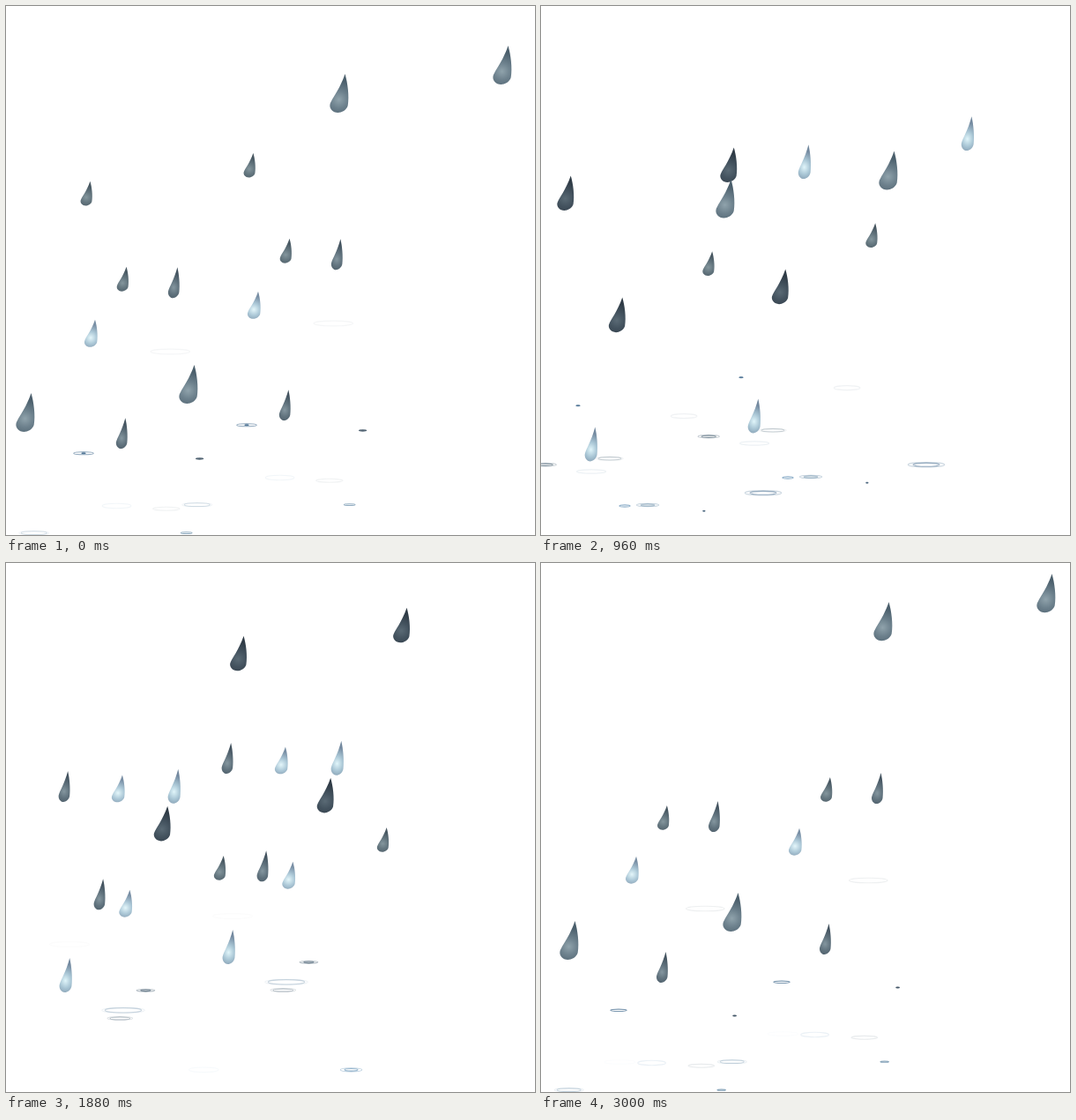
Recreate the animation shown at these times as an HTML page with a canvas. Size 600x600 px, loop 3.04 s.

```html
<!DOCTYPE html>
<html lang="en">
<head>
<meta charset="utf-8">
<title>Rain</title>
<style>
html, body { margin: 0; width: 100%; height: 100%; overflow: hidden; background: #fff; }
canvas { display: block; }
</style>
</head>
<body>
<canvas id="stage" width="600" height="600"></canvas>
<script>
const ctx = document.getElementById('stage').getContext('2d');
const STEP = 40, STEPS = 76, FALL = 14, RING_LIFE = 18, RING_DELAY = 4;
const VX = -10, VY = 32.9;

// Showers: landing offset x, y, delay in steps, optional cut-off age
const wide = [[0, 0, 0], [-82, 45, 7], [164, 45, 18], [-46, -54, 28], [45, 0, 37]];
const steep = [[0, 0, 0], [-115, 11, 5, 11], [81, 5, 25], [127, -45, 30], [164, 90, 48]];

// Placements of the showers, with drop colours from centre to edge
const clouds = [
  { drops: steep, x: 257, y: 400.5, start: 26, sx: .9, sy: .9, fill: ['#5a6a75', '#44535f', '#2f3b46'], ring: '#34495b' },
  { drops: steep, x: 269, y: 469, start: 51, sx: .615, sy: .797, fill: ['#84969f', '#61737e', '#43535f'], ring: '#45627b' },
  { drops: steep, x: 263, y: 481.3, start: 9, sx: .633, sy: .633, fill: ['#84969d', '#64767f', '#465660'], ring: '#455d6f' },
  { drops: wide, x: 280, y: 535, start: 20, sx: .68, sy: .885, fill: ['#e0f5fa', '#a9c6d5', '#73899f'], ring: '#5f8fb4' },
  { drops: wide, x: 274.4, y: 534, start: 54, sx: .703, sy: .703, fill: ['#e4f6fa', '#adc9d8', '#788ea4'], ring: '#648aa6' },
  { drops: wide, x: 273, y: 475.3, start: 71, sx: 1, sy: 1, fill: ['#90a3ac', '#6d818d', '#4b5f6c'], ring: '#456c8f' }
];
const copies = [[-185, 32], [0, 0]];

const dropShape = new Path2D(
  'M0 0C3 10 5 25 3.2 36C2 41 -4 44 -8 44C-14 44 -18 39 -17 34.5C-14.5 27 -6.5 19 0 0Z');

function dropFill([centre, middle, edge]) {
  const g = ctx.createRadialGradient(-7, 29, 0, -7, 29, 24);
  g.addColorStop(0, centre);
  g.addColorStop(.4, middle);
  g.addColorStop(.9, edge);
  return g;
}
for (const c of clouds) c.paint = dropFill(c.fill);

function drawDrop(c, x, y, age) {
  ctx.save();
  ctx.translate(x, y);
  ctx.scale(c.sx, c.sy);
  ctx.translate(2.5 + VX * age, -47.5 + VY * age);
  ctx.fillStyle = c.paint;
  ctx.fill(dropShape);
  ctx.restore();
}

function drawRing(c, x, y, age) {
  if (age < 1 || age >= RING_LIFE) return;
  const width = 5.4 * age - .14 * age * age;
  ctx.globalAlpha = (1 - age / RING_LIFE) ** 1.4;
  ctx.strokeStyle = c.ring;
  ctx.lineWidth = 1.1;
  ctx.beginPath();
  ctx.ellipse(x, y, Math.max(.8, width / 2 * c.sx - .5), Math.max(.5, width * .063 * c.sy), 0, 0, Math.PI * 2);
  ctx.stroke();
  ctx.globalAlpha = 1;
}

function draw(now) {
  const step = Math.floor(now / STEP) % STEPS;
  ctx.fillStyle = '#fff';
  ctx.fillRect(0, 0, 600, 600);
  for (const c of clouds) for (const [ox, oy] of copies) {
    for (const [dx, dy, delay, cut = 99] of c.drops) {
      const x = c.x + ox + dx * c.sx, y = c.y + oy + dy * c.sy;
      const age = (step - c.start - delay + FALL + 2 * STEPS) % STEPS - FALL;
      if (age <= 0) drawDrop(c, x, y, age);
      else if (age < cut) {
        drawRing(c, x, y, age);
        drawRing(c, x, y, age - RING_DELAY);
      }
    }
  }
}

const begin = performance.now();
function tick() {
  draw(performance.now() - begin);
  requestAnimationFrame(tick);
}
tick();
</script>
</body>
</html>
```
